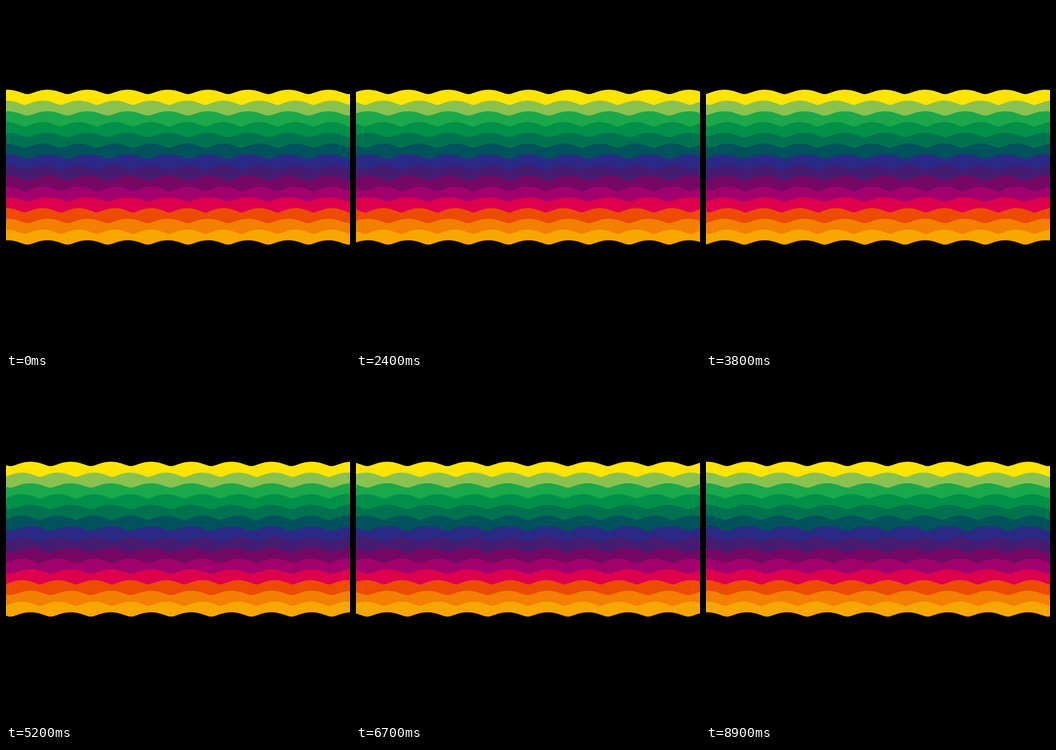
Write an HTML page with a canvas that moves like this. It is 748 px wide and 748 px high and loops after 9 s.

```html
<!DOCTYPE html>
<html lang="en">
<head>
<meta charset="utf-8">
<title>Rainbow waves</title>
<style>
  html, body { margin: 0; width: 100%; height: 100%; overflow: hidden; background: #000; }
  canvas { display: block; width: 748px; height: 748px; }
</style>
</head>
<body>
<canvas id="stage" width="748" height="748"></canvas>
<script>
const SIZE = 748, LOOP = 9000, STEP = 100;
const TOP = 182.1, GAP = 23.38;
const COLORS = [
  '#ffe400', '#8ac250', '#1ba84b', '#009049', '#007250', '#00525c', '#2a2a86',
  '#451c71', '#750864', '#a2006d', '#de004d', '#ec4b00', '#f38000', '#f9a600', '#000'
];

// Alternate edges drift in opposite directions, one period per loop.
// Slopes run straight from bend a to bend b, as fractions of half a period.
const WAVES = [
  { period: 87.28, crest: 90.25, dir: 1, a: 0.55, b: 0.83, depth: 9.4, dy: 0 },
  { period: 78.55, crest: 79.8, dir: -1, a: 0.55, b: 0.9, depth: 9.4, dy: 0.2 }
];

const ctx = document.getElementById('stage').getContext('2d');

// Drop below the crest: round top, straight flank, tight trough.
function drop(u, { a, b, depth }) {
  const slope = 2 * depth / (1 + b - a);
  if (u < a) return slope * u * u / (2 * a);
  if (u < b) return slope * (u - a / 2);
  return depth - slope * (1 - u) ** 2 / (2 * (1 - b));
}

function edgeY(x, wave, progress) {
  const cycles = (x - wave.crest) / wave.period - wave.dir * progress;
  return drop(2 * Math.abs(cycles - Math.round(cycles)), wave);
}

function draw(progress) {
  ctx.fillStyle = '#000';
  ctx.fillRect(0, 0, SIZE, SIZE);
  COLORS.forEach((color, i) => {
    const wave = WAVES[i % 2];
    const y = TOP + i * GAP + wave.dy;
    ctx.fillStyle = color;
    ctx.beginPath();
    ctx.moveTo(0, SIZE);
    for (let x = 0; x <= SIZE; x++) ctx.lineTo(x, y + edgeY(x, wave, progress));
    ctx.lineTo(SIZE, SIZE);
    ctx.fill();
  });
}

const start = performance.now();
function tick() {
  const t = (performance.now() - start) % LOOP;
  draw(Math.floor(t / STEP) * STEP / LOOP);
  requestAnimationFrame(tick);
}
tick();
</script>
</body>
</html>
```
